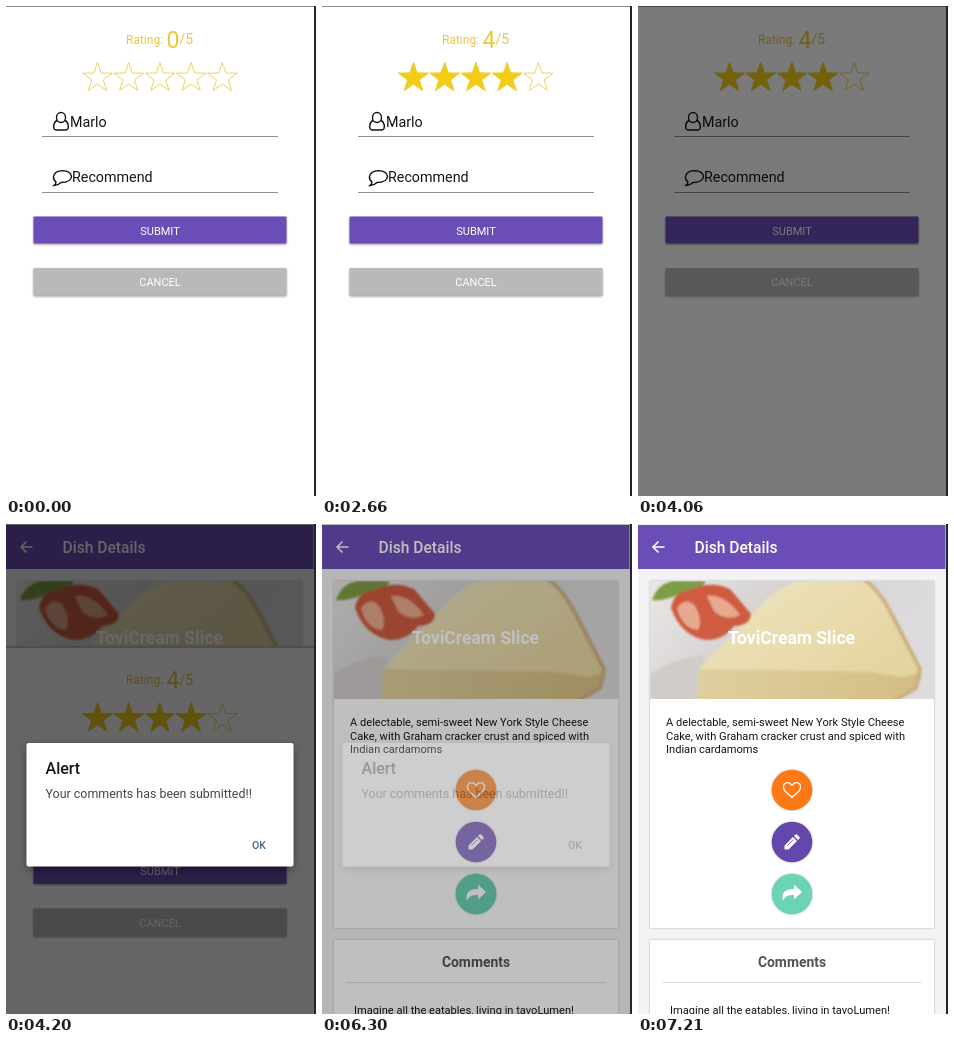
These frames come from a looping animation (310 by 490 pixels, 7.28 s). An HTML page:

```html
<!DOCTYPE html>
<html lang="en">
<head>
<meta charset="utf-8">
<title>Dish rating form</title>
<style>
  html, body { margin: 0; width: 100%; height: 100%; overflow: hidden; background: #fff; }
  svg { display: block; width: 310px; height: 490px; font-family: Roboto, sans-serif; }
  .mid { text-anchor: middle; }
  .medium { font-weight: 500; }
  .bold { font-weight: 700; }
  .gold { fill: #ecc63d; }
  .icon { fill: none; stroke: #111; stroke-width: 1.4; }
  .button { font-size: 11px; fill: #fff; text-anchor: middle; }
  .body { font-size: 11.1px; fill: #151515; }
  .shadow { filter: drop-shadow(0 1px 1px #0006); }
  .soft { filter: drop-shadow(0 .5px 1px #0004); }
</style>
</head>
<body>
<svg viewBox="0 0 310 490">
  <defs>
    <linearGradient id="plate" x2="1" y2=".3">
      <stop stop-color="#e9e7e6"/><stop offset=".4" stop-color="#d6d3d2"/><stop offset="1" stop-color="#dddbdd"/>
    </linearGradient>
    <linearGradient id="cake" x2="1" y2=".6">
      <stop stop-color="#eee5c3"/><stop offset="1" stop-color="#e5d5a0"/>
    </linearGradient>
    <linearGradient id="side" x2="1">
      <stop stop-color="#e0cf9f"/><stop offset="1" stop-color="#d3bd83"/>
    </linearGradient>
    <filter id="blur"><feGaussianBlur stdDeviation="1.2"/></filter>
    <clipPath id="photo"><path d="M12 57H296V175H12Z"/></clipPath>
    <clipPath id="filled"><rect id="fill" x="75" y="54" height="34"/></clipPath>
    <path id="stars"/>
  </defs>

  <g id="dish">
    <path fill="#f3f2f5" d="M0 0H310V490H0Z"/>
    <path fill="#6b4db7" d="M0 1H307.500V45H0Z"/>
    <path d="M26.500 23H15M20.500 17.500L15 23L20.500 28.500" fill="none" stroke="#fff" stroke-width="1.5"/>
    <text x="56.500" y="29" class="medium" font-size="15.6" fill="#fff">Dish Details</text>

    <path class="soft" fill="#fff" d="M12 57H296V404H12ZM12 416H296V500H12Z"/>
    <g clip-path="url(#photo)">
      <path fill="url(#plate)" d="M12 57H296V175H12Z"/>
      <g filter="url(#blur)">
        <path fill="#d0ccca" d="M12 150Q40 132 66 132V180H12Z"/>
        <path fill="url(#side)" d="M62 142L276 140L284 152L278 166L255 180H58Z"/>
        <path fill="url(#cake)" d="M61 145L130 74Q150 57 172 55H222Q236 61 246 80L284 148L266 153L232 148Z"/>
        <path d="M226 55Q241 66 252 87L282 145L278 164L256 176" fill="none" stroke="#cdb083" stroke-width="4"/>
        <path fill="#7f9d45" d="M14 76Q20 59 36 57H68Q62 68 46 68Q27 78 14 76Z"/>
        <path fill="#cf5b41" d="M33 84Q36 67 52 66Q72 56 92 65L113 90Q113 102 96 102Q86 116 68 116Q43 112 33 84Z"/>
        <path fill="#e8aa8f" d="M39 84Q48 72 57 82Q65 96 60 106Q44 104 39 84ZM69 72Q87 70 102 91Q88 98 76 87Z"/>
      </g>
    </g>
    <text x="153.500" y="120" class="mid bold" font-size="17.5" fill="#fff">ToviCream Slice</text>
    <g class="body">
      <text x="28" y="202">A delectable, semi-sweet New York Style Cheese</text>
      <text x="28" y="215.500">Cake, with Graham cracker crust and spiced with</text>
      <text x="28" y="229">Indian cardamoms</text>
      <text x="32" y="490">Imagine all the eatables, living in tavoLumen!</text>
    </g>
    <g class="soft">
      <circle cx="154" cy="266" r="20.300" fill="#fb7a16"/>
      <circle cx="154" cy="318" r="20.300" fill="#6446ac"/>
      <circle cx="154" cy="370" r="20.300" fill="#6bd3b6"/>
    </g>
    <path d="M154 273.500L147 267Q143.500 262 147.500 259Q151.500 257.500 154 261.500Q156.500 257.500 160.500 259Q164.500 262 161 267Z"
      fill="none" stroke="#fff" stroke-width="1.3" stroke-linejoin="round"/>
    <path fill="#fff" d="M146.500 325.500V321.500L155 313L159 317L150.500 325.500ZM156 312L157.500 310.500Q158.500 310 159.500 311L161.500 313Q162 314 161.500 314.500L160 316Z"/>
    <path d="M149.500 321.500L155.500 315.500" stroke="#6446ac" stroke-width=".8"/>
    <path fill="#fff" d="M145 377Q142 365 156 365V360.500L164 368L156 375.500V371Q147 370 145 377Z"/>
    <text x="154" y="443" class="mid bold" font-size="13.9" fill="#50545a">Comments</text>
    <path stroke="#dcdcdf" d="M24 458.500H284"/>
  </g>

  <g id="form">
    <path fill="#fff" d="M0 0H310V490H0Z"/>
    <path fill="#8b8b8b" d="M0 0H308V1H0Z"/>
    <g class="gold">
      <text x="120" y="37.500" font-size="12">Rating:</text>
      <text id="score" x="160.500" y="41.500" font-size="23"></text>
      <text x="173.500" y="38" font-size="14">/5</text>
    </g>
    <use href="#stars" fill="#fff" stroke="#edd35c"/>
    <use href="#stars" fill="#f4cc16" stroke="#efcf3c" clip-path="url(#filled)"/>

    <g class="icon">
      <ellipse cx="55" cy="111.500" rx="4.500" ry="5"/>
      <path d="M51 114.500Q47.500 116 47.700 121.500Q48 124 50.500 124H59.500Q62 124 62.300 121.500Q62.500 116 59 114.500"/>
      <path d="M50 176Q47 173.500 47.500 170.500Q48.500 165 56.500 164.600Q64.800 165 65.500 170.500Q64.800 176.500 55 176.500Q52 179.500 48 179.500Q50 178 50 176Z"/>
    </g>
    <g font-size="14.3" fill="#161616">
      <text x="64" y="120.500">Marlo</text>
      <text x="66" y="176">Recommend</text>
    </g>
    <path stroke="#89908f" d="M36 130.500H272M36 186.500H272"/>
    <rect class="shadow" x="27.500" y="210.500" width="253" height="27" rx="1" fill="#6b4db7"/>
    <rect class="shadow" x="27.500" y="262" width="253" height="27.500" rx="1" fill="#b9b9b9"/>
    <text x="154" y="228.500" class="button">SUBMIT</text>
    <text x="154" y="280" class="button">CANCEL</text>
  </g>

  <path id="dim" d="M0 0H310V490H0Z"/>
  <g id="alert">
    <rect x="20.500" y="219" width="267" height="123.500" rx="2" fill="#fff" style="filter:drop-shadow(0 3px 4px #0006)"/>
    <text x="39.500" y="250" class="medium" font-size="16" fill="#171717">Alert</text>
    <text x="39.500" y="274" font-size="12.45" fill="#454545">Your comments has been submitted!!</text>
    <text x="246" y="324.500" class="medium" font-size="10.5" fill="#416b91">OK</text>
  </g>
  <path fill="#26242b" d="M308 0H310V490H308Z"/>
</svg>
<script>
  const LOOP = 7280, STEP = 70, STAR = 31.2;
  const el = id => document.getElementById(id);

  function starPath(cx, cy, radius) {
    const points = Array.from({ length: 10 }, (_, i) => {
      const r = i % 2 ? radius * 0.39 : radius, a = i * Math.PI / 5;
      return `${cx + r * Math.sin(a)} ${cy - r * Math.cos(a)}`;
    });
    return `M${points.join('L')}Z`;
  }
  el('stars').setAttribute('d', [0, 1, 2, 3, 4].map(i => starPath(91.5 + i * STAR, 72, 15.6)).join(''));

  // Linear interpolation through [time, value] pairs, held at both ends.
  function track(t, keys) {
    const next = keys.findIndex(key => key[0] > t);
    if (next === 0) return keys[0][1];
    if (next < 0) return keys[keys.length - 1][1];
    const [t0, v0] = keys[next - 1], [t1, v1] = keys[next];
    return v0 + (v1 - v0) * (t - t0) / (t1 - t0);
  }

  const rating = [[980, 0], [1680, 4]];
  const dimming = [[3920, 0], [4060, .52], [4130, .6], [6090, .6], [6300, .25], [6370, .1], [6790, 0]];
  const alertAlpha = [[4060, 0], [4200, 1], [6090, 1], [6300, .23], [6370, 0]];
  const slide = [[4060, 0], [4340, 1]];

  function draw(elapsed) {
    const t = Math.floor(elapsed % LOOP / STEP) * STEP;
    const stars = track(t, rating);
    el('score').textContent = Math.ceil(stars);
    el('fill').setAttribute('width', stars * STAR);
    el('form').setAttribute('transform', `translate(0 ${490 * track(t, slide) ** 2})`);
    el('form').setAttribute('visibility', t < 4340 ? 'visible' : 'hidden');
    el('dim').setAttribute('opacity', track(t, dimming));
    el('alert').setAttribute('opacity', track(t, alertAlpha));
    requestAnimationFrame(() => draw(performance.now() - start));
  }

  const start = performance.now();
  draw(0);
</script>
</body>
</html>
```
